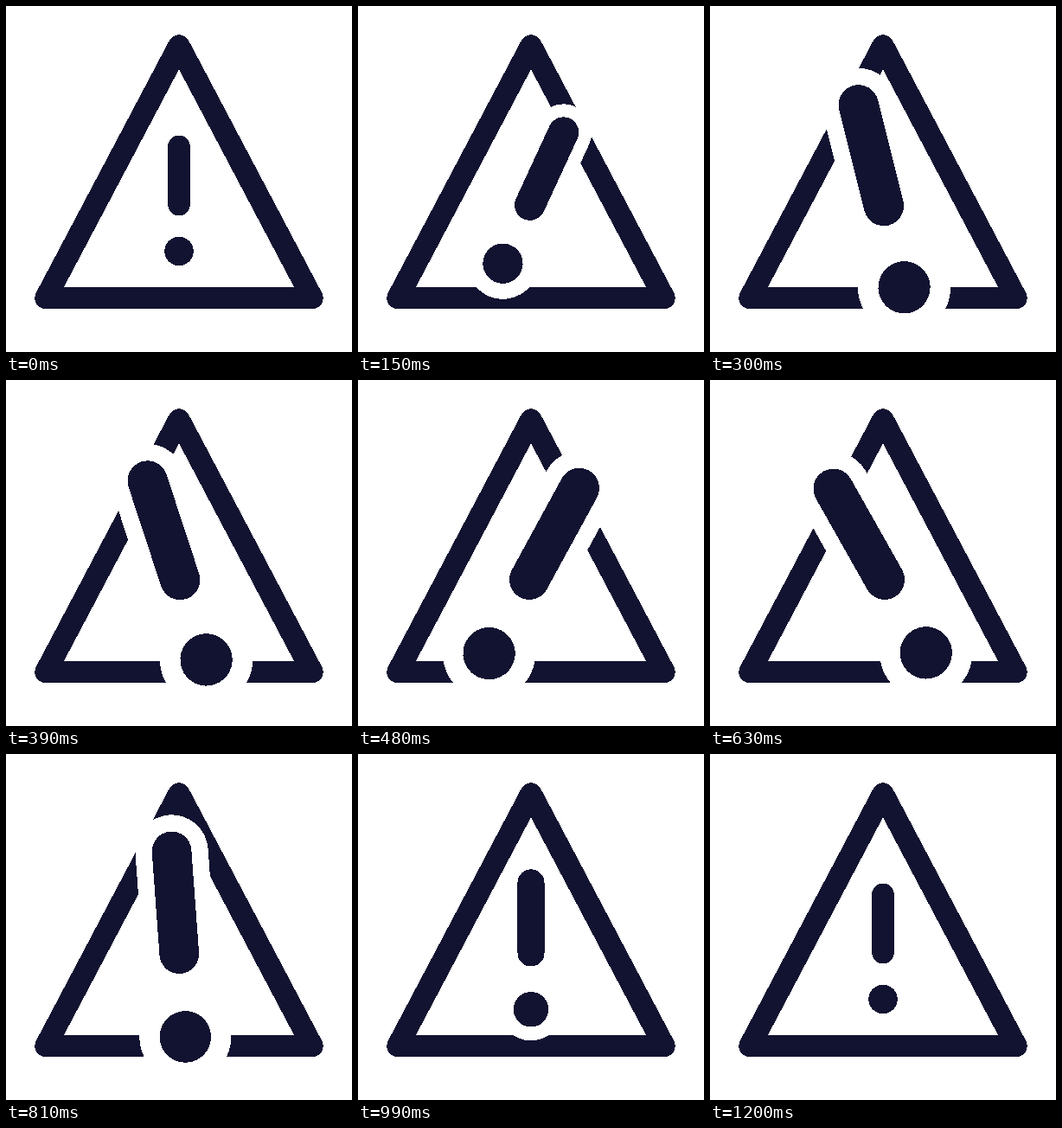
Write an HTML page that moves like this. It is 400 by 400 pixels and loops after 2230 ms.

```html
<!DOCTYPE html>
<html lang="en">
<head>
<meta charset="utf-8">
<title>Warning</title>
<style>
  html, body { margin: 0; width: 100%; height: 100%; overflow: hidden; background: #fff; }
  svg { display: block; width: 100vw; height: 100vh; shape-rendering: crispEdges; }
  path { fill: none; stroke-linecap: round; stroke-linejoin: round; }
  .ink path { stroke: #121331; }
  .ink circle { fill: #121331; }
  .gap path { stroke: #fff; }
  .gap circle { fill: #fff; }
</style>
</head>
<body>
<svg viewBox="0 0 400 400">
  <g class="ink"><path d="M200 46 L354 337.5 H46 Z" stroke-width="25.4"/></g>
  <!-- Exclamation mark, relative to its pivot, over a wider white copy -->
  <g id="mark">
    <g class="gap">
      <path d="M0 -64.8 V2.2" stroke-width="47.4"/>
      <circle cy="56.2" r="29.8"/>
    </g>
    <g class="ink">
      <path d="M0 -64.8 V2.2" stroke-width="25.7"/>
      <circle cy="56.2" r="16.75"/>
    </g>
  </g>
</svg>
<script>
const mark = document.getElementById('mark');
const LOOP = 2230, STEP = 30;

// Keys are [time in ms, value], eased in and out between neighbours.
const ANGLE = [[0, 0], [204, 30], [349, -30], [493, 30], [638, -30], [863, 0]];
const SCALE = [[0, 1], [310, 1.8], [778, 1.8], [1097, 1]];

function valueAt(keys, t) {
  for (let i = 1; i < keys.length; i++) {
    const [t0, a] = keys[i - 1], [t1, b] = keys[i];
    if (t < t1) {
      const x = (t - t0) / (t1 - t0);
      return a + (b - a) * x * x * (3 - 2 * x);
    }
  }
  return keys[keys.length - 1][1];
}

function draw(t) {
  const angle = valueAt(ANGLE, t), scale = valueAt(SCALE, t);
  mark.setAttribute('transform', `translate(200 227.3) rotate(${angle}) scale(${scale})`);
}

const start = performance.now();
function tick() {
  const t = (performance.now() - start) % LOOP;
  draw(Math.floor(t / STEP) * STEP);
  requestAnimationFrame(tick);
}
tick();
</script>
</body>
</html>
```
